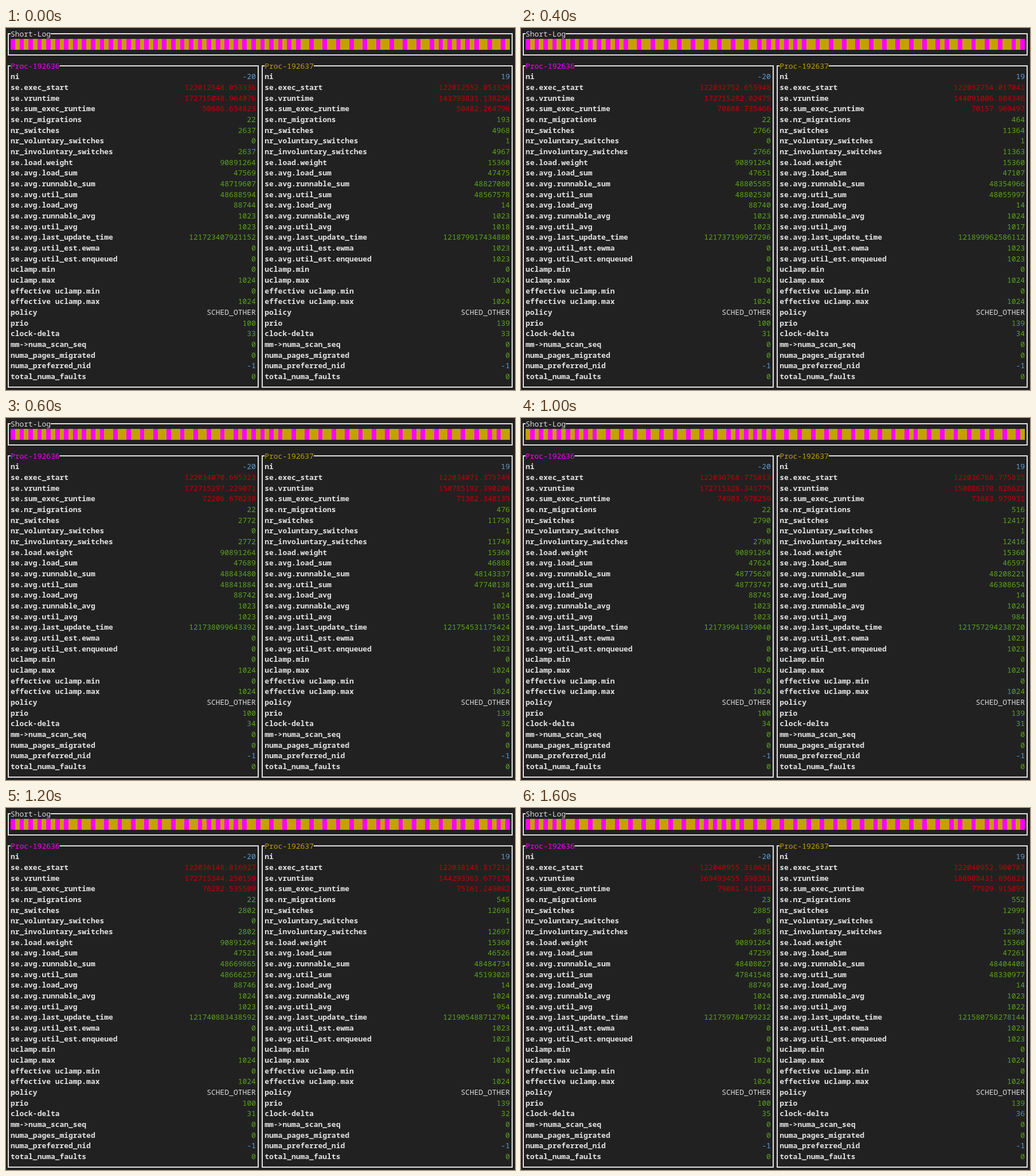
Recreate the animation shown at these times as an HTML page with a canvas. Size 888 px wide and 631 px high, loop 1800 ms.

```html
<!DOCTYPE html>
<html lang="en">
<head>
<meta charset="utf-8">
<title>Scheduler monitor</title>
<style>
  html, body { margin: 0; width: 100%; height: 100%; overflow: hidden; background: #212121; }
  canvas { display: block; }
</style>
</head>
<body>
<canvas id="stage" width="888" height="631"></canvas>
<script>
const ctx = document.getElementById('stage').getContext('2d');
const CELL_W = 7.777, CELL_H = 18.667, LEFT = 8, MIDDLE = 10;
const COLUMNS = 112, STEP_MS = 200;
const FONT = '12.96px "Noto Sans Mono", "DejaVu Sans Mono", monospace';
const COLOR = {
  back: '#212121', line: '#dedede', text: '#dcdcdc', label: '#e4e4e4',
  pink: '#ff00ff', gold: '#c4a000', red: '#c40303', green: '#5aa51c', blue: '#5c9fd8'
};

// Per step: position among the sampled readings, and how far the log has scrolled.
const SAMPLE_AT = [0, 0.93, 1, 1.5, 2, 2.5, 3, 4, 5];
const LOG_OFFSET = [0, 40, 42, 44, 46, 49, 52, 54, 56];

// Pink slots of the log as runs of [spacing, count].
const LOG_RUNS = [[2, 32], [3, 10], [2, 5], [3, 10], [2, 1], [3, 5], [2, 1], [3, 2], [2, 4]];
const pinkSlots = new Set([0]);
let slot = 0;
for (const [spacing, count] of LOG_RUNS) {
  for (let i = 0; i < count; i++) pinkSlots.add(slot += spacing);
}

const LABELS = `ni
se.exec_start
se.vruntime
se.sum_exec_runtime
se.nr_migrations
nr_switches
nr_voluntary_switches
nr_involuntary_switches
se.load.weight
se.avg.load_sum
se.avg.runnable_sum
se.avg.util_sum
se.avg.load_avg
se.avg.runnable_avg
se.avg.util_avg
se.avg.last_update_time
se.avg.util_est.ewma
se.avg.util_est.enqueued
uclamp.min
uclamp.max
effective uclamp.min
effective uclamp.max
policy
prio
clock-delta
mm->numa_scan_seq
numa_pages_migrated
numa_preferred_nid
total_numa_faults`.split('\n');

const shared = {
  'uclamp.min': 0, 'uclamp.max': 1024,
  'effective uclamp.min': 0, 'effective uclamp.max': 1024,
  policy: 'SCHED_OTHER', 'mm->numa_scan_seq': 0, numa_pages_migrated: 0,
  numa_preferred_nid: -1, total_numa_faults: 0
};

// Arrays are sampled readings, functions derive a value from the sample position.
const first = {
  ...shared,
  ni: -20,
  'se.exec_start': [122012548.053336, 122032752.655948, 122035388.734698, 122038148.816927, 122039536.858586, 122040955.318621],
  'se.vruntime': [172715048.964076, 172715282.02475, 172715312.433392, 172715344.250159, 172715360.237541, 169493455.398381],
  'se.sum_exec_runtime': [50686.654823, 70888.735466, 73524.605009, 76282.535509, 77668.347853, 79081.411853],
  'se.nr_migrations': s => s < 5 ? 22 : 23,
  nr_switches: [2637, 2766, 2778, 2802, 2811, 2885],
  nr_voluntary_switches: 0,
  'se.load.weight': 90891264,
  'se.avg.load_sum': [47569, 47651, 47727, 47521, 47120, 47259],
  'se.avg.runnable_sum': [48719607, 48805585, 48881375, 48669865, 48259134, 48408027],
  'se.avg.util_sum': [48688594, 48802530, 48881237, 48666257, 48077698, 47841548],
  'se.avg.load_avg': [88744, 88740, 88744, 88746, 88747, 88749],
  'se.avg.runnable_avg': s => s < 3 ? 1023 : 1024,
  'se.avg.util_avg': [1023, 1023, 1023, 1023, 1020, 1012],
  'se.avg.last_update_time': [121723407921152, 121737199927296, 121738999359488, 121740883438592, 121741830939648, 121759784799232],
  'se.avg.util_est.ewma': 0,
  'se.avg.util_est.enqueued': 0,
  prio: 100,
  'clock-delta': [33, 31, 36, 31, 43, 35]
};

const second = {
  ...shared,
  ni: 19,
  'se.exec_start': [122012552.053329, 122032754.017041, 122035388.734458, 122038148.817212, 122039536.858534, 122040952.900787],
  'se.vruntime': [143793831.138256, 144091006.804346, 157479377.976065, 144293363.677178, 188812047.037521, 188908431.896823],
  'se.sum_exec_runtime': [50482.264796, 70157.969497, 72606.71078, 75161.249082, 76518.027504, 77929.915095],
  'se.nr_migrations': [193, 464, 487, 545, 552, 552],
  nr_switches: [4968, 11364, 12135, 12698, 12907, 12999],
  nr_voluntary_switches: 1,
  'se.load.weight': 15360,
  'se.avg.load_sum': [47475, 47107, 46668, 46526, 47432, 47261],
  'se.avg.runnable_sum': [48827080, 48354966, 47931707, 48484734, 48579082, 48404408],
  'se.avg.util_sum': [48567578, 48055997, 47424279, 45193028, 48434455, 48330977],
  'se.avg.load_avg': 14,
  'se.avg.runnable_avg': s => s > 0 && s < 5 ? 1024 : 1023,
  'se.avg.util_avg': [1018, 1017, 1013, 954, 1021, 1022],
  'se.avg.last_update_time': [121879917434880, 121899962586112, 121609099764736, 121905488712704, 121579791663104, 121580758278144],
  'se.avg.util_est.ewma': 1023,
  'se.avg.util_est.enqueued': 1023,
  prio: 139,
  'clock-delta': [33, 34, 30, 32, 32, 36]
};

for (const proc of [first, second]) {
  proc.nr_involuntary_switches = s => reading(proc.nr_switches, s) - proc.nr_voluntary_switches;
}

function reading(source, s) {
  if (typeof source === 'function') return source(s);
  if (!Array.isArray(source)) return source;
  const i = Math.floor(s), a = source[i];
  if (i === s) return a;
  const value = a + (source[i + 1] - a) * (s - i);
  return Number.isInteger(a) ? Math.round(value) : +value.toFixed(6);
}

function valueColor(label, value) {
  if (typeof value === 'string') return COLOR.text;
  if (label === 'ni' || value < 0) return COLOR.blue;
  return Number.isInteger(value) ? COLOR.green : COLOR.red;
}

const cellX = column => LEFT + column * CELL_W;
const rowY = row => MIDDLE + row * CELL_H;

function write(text, column, row, color, weight = 400, align = 'left') {
  ctx.font = `${weight} ${FONT}`;
  ctx.textAlign = align;
  ctx.fillStyle = color;
  ctx.fillText(text, cellX(column), Math.round(rowY(row) + 4.8));
}

function box(column, endColumn, row, endRow, title, color) {
  const x0 = Math.round(cellX(column - 0.5)), x1 = Math.round(cellX(endColumn + 0.5));
  const y0 = Math.round(rowY(row)), y1 = Math.round(rowY(endRow));
  ctx.strokeStyle = COLOR.line;
  ctx.lineWidth = 2;
  ctx.beginPath();
  ctx.moveTo(cellX(column), y0);
  ctx.lineTo(x0, y0);
  ctx.lineTo(x0, y1);
  ctx.lineTo(x1, y1);
  ctx.lineTo(x1, y0);
  ctx.lineTo(cellX(column + title.length), y0);
  ctx.stroke();
  write(title, column, row, color);
}

function drawLog(offset) {
  const top = Math.round(rowY(0.5)), height = Math.round(rowY(1.5)) - top;
  for (let i = 0; i < COLUMNS; i++) {
    const x = Math.round(cellX(i));
    ctx.fillStyle = pinkSlots.has(i + offset) ? COLOR.pink : COLOR.gold;
    ctx.fillRect(x, top, Math.round(cellX(i + 1)) - x, height);
  }
}

function drawProcess(proc, column, title, color, s) {
  const end = column + 55;
  box(column, end, 3, 33, title, color);
  LABELS.forEach((label, i) => {
    const value = reading(proc[label], s);
    write(label, column, i + 4, COLOR.label, 600);
    write(String(value), end, i + 4, valueColor(label, value), 400, 'right');
  });
}

function draw(step) {
  const s = SAMPLE_AT[step];
  ctx.fillStyle = COLOR.back;
  ctx.fillRect(0, 0, 888, 631);
  box(0, COLUMNS, 0, 2, 'Short-Log', COLOR.text);
  drawLog(LOG_OFFSET[step]);
  drawProcess(first, 0, 'Proc-192636', COLOR.pink, s);
  drawProcess(second, 57, 'Proc-192637', COLOR.gold, s);
}

let start;
function tick(now) {
  start ??= now;
  draw(Math.floor((now - start) / STEP_MS) % SAMPLE_AT.length);
  requestAnimationFrame(tick);
}
draw(0);
requestAnimationFrame(tick);
</script>
</body>
</html>
```
